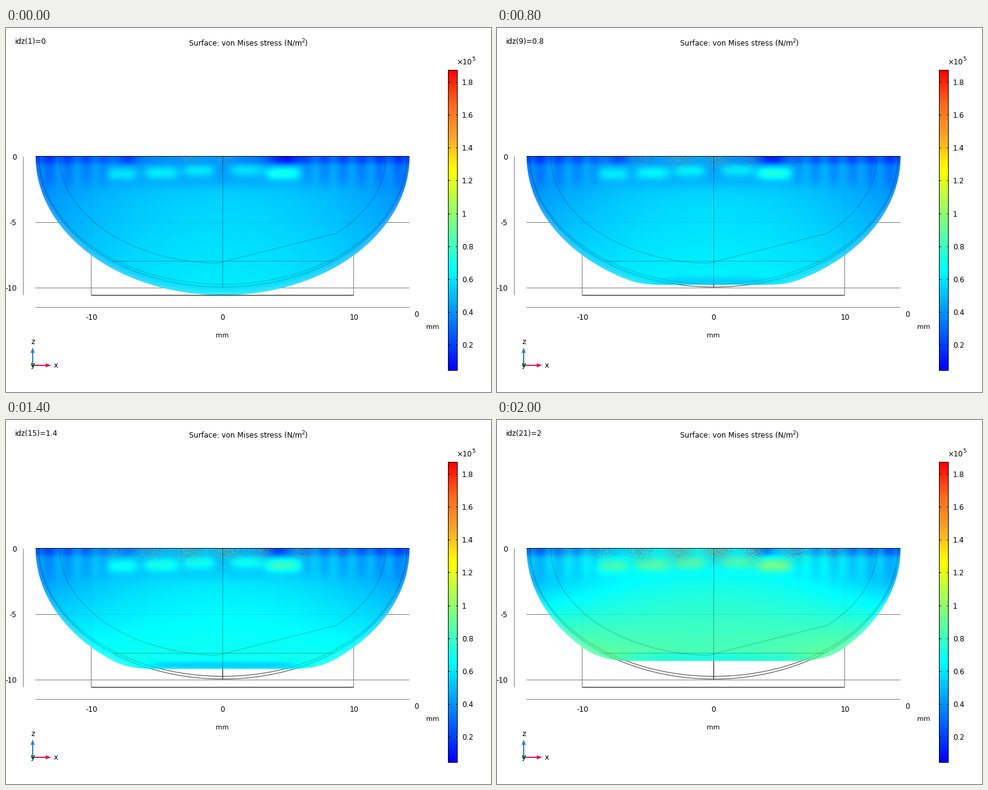
Write a matplotlib script that moves like this. It is 800 by 600 pixels and loops after 2.1 s.

```python
import numpy as np
import matplotlib.pyplot as plt
from matplotlib.animation import FuncAnimation
from matplotlib.colors import LinearSegmentedColormap
from matplotlib.patches import Circle, Polygon, Rectangle

W, H, PT = 800, 600, 0.72          # stage in pixels, points per pixel
CX, TOP, RX, RY = 357.3, 212, 308.3, 228.4
MM = 21.65                         # pixels per millimetre
FRAMES = 21

plt.rcParams["font.family"] = "DejaVu Sans"
plt.rcParams["path.snap"] = False
rainbow = LinearSegmentedColormap.from_list("rainbow", [
    (0, "#0000ff"), (1 / 3, "#00ffff"), (2 / 3, "#ffff00"),
    (0.78, "#f9a42a"), (0.89, "#ff661c"), (1, "#ff0000")], N=512)

fig = plt.figure(figsize=(W / 100, H / 100), dpi=100, facecolor="white")
ax = fig.add_axes([0, 0, 1, 1])
ax.axis("off")


def line(xs, ys, color="#808080", z=1, alpha=1, width=1):
    ax.plot(xs, ys, color=color, lw=width * PT, zorder=z, alpha=alpha,
            solid_capstyle="butt")


def label(x, y, s, size=12, ha="left"):
    return ax.text(x, y, s, fontsize=size * PT, ha=ha, va="baseline", zorder=6)


def half_ellipse(rx, ry, a=0.0, b=np.pi):
    th = np.linspace(a, b, 200)
    return CX + 0.4 - rx * np.cos(th), TOP + ry * np.sin(th)


def sig(z):
    return 1 / (1 + np.exp(-z))


def bump(u, c, w, p=2):
    return np.exp(-np.abs((u - c) / w) ** p)


# Stress field on the pixel grid
X0, X1, Y1 = 48, 667, 442
x, y = np.meshgrid(np.arange(X0, X1) + 0.5, np.arange(TOP, Y1) + 0.5)
d = y - TOP
X, D = (x - CX) / RX, d / RY
r = np.hypot(X, D)
edge = (1 - r) * r / np.hypot(X / RX, D / RY)
rim = sig((np.hypot((x - CX) / 304, d / 215) - 1) * 250)
noise = np.random.default_rng(4).normal(size=x.shape)
top, mid = sig((11 - d) / 2.5), sig((46 - d) / 6)
side = np.abs(x - 329)
stripes = sig((side - 165) / 12) * np.cos(2 * np.pi * (side - 181) / 30.5)
BLOBS = [(192, 29, 25, 0.10), (257, 27, 29, 0.11), (318, 23, 26, 0.10),
         (397, 22, 28, 0.09), (457, 28, 29, 0.16)]
blobs = sum(a * bump(x, cx, w, 4) * bump(d, cy, 12) for cx, cy, w, a in BLOBS)
rest = 0.258 + 0.055 * D - 0.1 * X ** 2 * (1 - 0.4 * D)
pressed = 0.30 + 0.27 * D - 0.13 * D ** 2 - 0.14 * X ** 2 * (1 - D ** 2 / 0.35)


def surface(t):
    """RGBA image of the dome pressed in by t millimetres."""
    g = (t / 2) ** 2.6
    gap = TOP + RY + 0.2 - MM * t - y
    k = 10 * t + 1e-6
    soft = np.maximum(k - np.abs(edge - gap), 0) / k
    inside = np.minimum(edge, gap) - soft ** 2 * k / 4

    v = rest + (pressed - rest) * g
    half = RX * np.sqrt(max(0, 1 - (1 - MM * t / RY) ** 2))
    contact = sig((half - 35 - np.abs(x - CX)) / 10) * bump(gap, 6, 7)
    v -= 0.1 * min(1, t / 1.4) ** 1.3 * (1 - 0.4 * g) * contact

    middle = bump(x, 340, 230, 4)
    band = (0.205 + g * (0.08 + 0.05 * middle) - 0.05 * X ** 4
            + 0.02 * stripes + blobs)
    cap = (0.115 + g * (0.05 + 0.09 * middle) + 0.09 * bump(x, 320, 120)
           + 0.028 * stripes
           - 0.12 * bump(x, 460 - 9 * t, 28 - 6 * t)
           - 0.07 * (1 - g) * bump(x, 202, 14) - 0.04 * X ** 6)
    v += (band - v) * mid
    v += (cap - v) * top

    grain = (bump(x, 335 + 12 * t, 95 + 55 * t) * bump(d, 0, 11 + 5 * t)
             * (1 - 0.9 * bump(x, 450, 26 - 5 * t))
             * (0.65 + 0.35 * np.cos((x - 300) * 2 * np.pi / 64)))
    grain *= 0.35 + 0.28 * t
    v += grain * 0.06 * noise - 0.015 * rim

    rgb = rainbow(np.clip(v, 0, 1))[..., :3]
    tint = np.array([0.47, 0.53, 0.50]) + 0.06 * noise[..., None]
    rgb += (tint - rgb) * (0.6 * np.clip(grain, 0, 1))[..., None]
    pale = rim * 0.2 * bump(edge, 0, 9) * np.clip(D * 2, 0, 1)
    rgb += (1 - rgb) * pale[..., None]
    alpha = np.clip(inside + 0.5, 0, 1)
    return np.clip(np.dstack([rgb, alpha]), 0, 1)


# Axes box and grid
line([28.5, 28.5], [TOP, 440.5])
for gy in (320.5, 428.5, 460.5):
    line([48.5, 665.5], [gy, gy])
for gx in (140.5, 573.5):
    line([gx, gx], [373, 440.5])
    line([gx, gx], [TOP, 373], "black", 3, 0.06)
line([86, 629], [320.5, 320.5], "black", 3, 0.08)
line([140.5, 573.5], [440.5, 440.5], "black", 4)
line([48.5, 665.5], [211.5, 211.5], "#101010", 4)

# Undeformed outlines, full strength where the dome no longer covers them
for rx, ry in ((304, 215), (303, 210.5)):
    xs, ys = half_ellipse(rx, ry)
    line(xs, ys, "#606060", 1)
    line(xs, ys, "black", 3, 0.22)
line([357.5] * 2, [TOP, 427], "black", 1)
line([357.5] * 2, [TOP, 427], "black", 3, 0.3)
line([357.5] * 2, [TOP, 240], "black", 3, 0.2)
line([177, 540], [384.5, 384.5], "black", 3, 0.25)
xa, ya = half_ellipse(269, 176, 0, np.arccos(9.7 / 269))
xb, yb = half_ellipse(269, 176, np.arccos(-187.3 / 269), np.pi)
line(np.r_[xa, xb], np.r_[ya, yb], "black", 3, 0.23)

# Text
counter = label(15, 26, "")
label(302, 29, "Surface: von Mises stress (N/m")
label(487, 23.5, "2", 9)
label(492.5, 29, ")")
for s, ty in (("0", 217), ("-5", 325), ("-10", 433)):
    label(17.7, ty, s, ha="right")
for s, tx in (("-10", 141), ("0", 357), ("10", 574)):
    label(tx, 481, s, ha="center")
label(357, 510, "mm", 11, "center")
label(704, 496, "mm", 11, "center")
label(676.5, 476, "0", ha="center")

# Colour bar
ramp = np.linspace(1, 0, 495)[:, None]
ax.imshow(rainbow(ramp), extent=(729.5, 744.5, 564.5, 69.5), aspect="auto",
          interpolation="nearest", zorder=2)
ax.add_patch(Rectangle((729.5, 69.5), 15, 495, fill=False, ec="black",
                       lw=PT, zorder=4))
for i in range(1, 10):
    ty = np.floor(576.5 - 54.1 * i) + 0.5
    line([730, 732.5], [ty, ty], "black", 4)
    line([742, 744.5], [ty, ty], "black", 4)
    label(752, ty + 4.5, f"{i / 5:g}")
label(743.5, 60, "×10")
label(768.6, 54.5, "5", 9)

# Orientation triad
BLUE, RED = "#3f7dbd", "#d81b5b"
line([44, 44], [556, 534], BLUE, 4, width=2)
line([44, 67], [556, 556], RED, 4, width=2)
for pts, c in (([(44, 526.5), (40.5, 535.5), (47.5, 535.5)], BLUE),
               ([(74.5, 556), (65.5, 552.5), (65.5, 559.5)], RED)):
    ax.add_patch(Polygon(pts, fc=c, ec="none", zorder=4))
ax.add_patch(Circle((44, 556), 2.8, fc="#3fae5a", ec="none", zorder=5))
label(41, 521, "z")
label(79, 559.5, "x")
label(40.5, 559, "y")

image = ax.imshow(surface(0), extent=(X0, X1, Y1, TOP), aspect="auto",
                  interpolation="nearest", zorder=2)
ax.set_xlim(0, W)
ax.set_ylim(H, 0)


def update(i):
    t = i / 10
    image.set_data(surface(t))
    counter.set_text(f"idz({i + 1})={t:g}")
    return image, counter


anim = FuncAnimation(fig, update, frames=FRAMES, interval=100,
                     repeat=True, repeat_delay=0)
plt.show()
```
